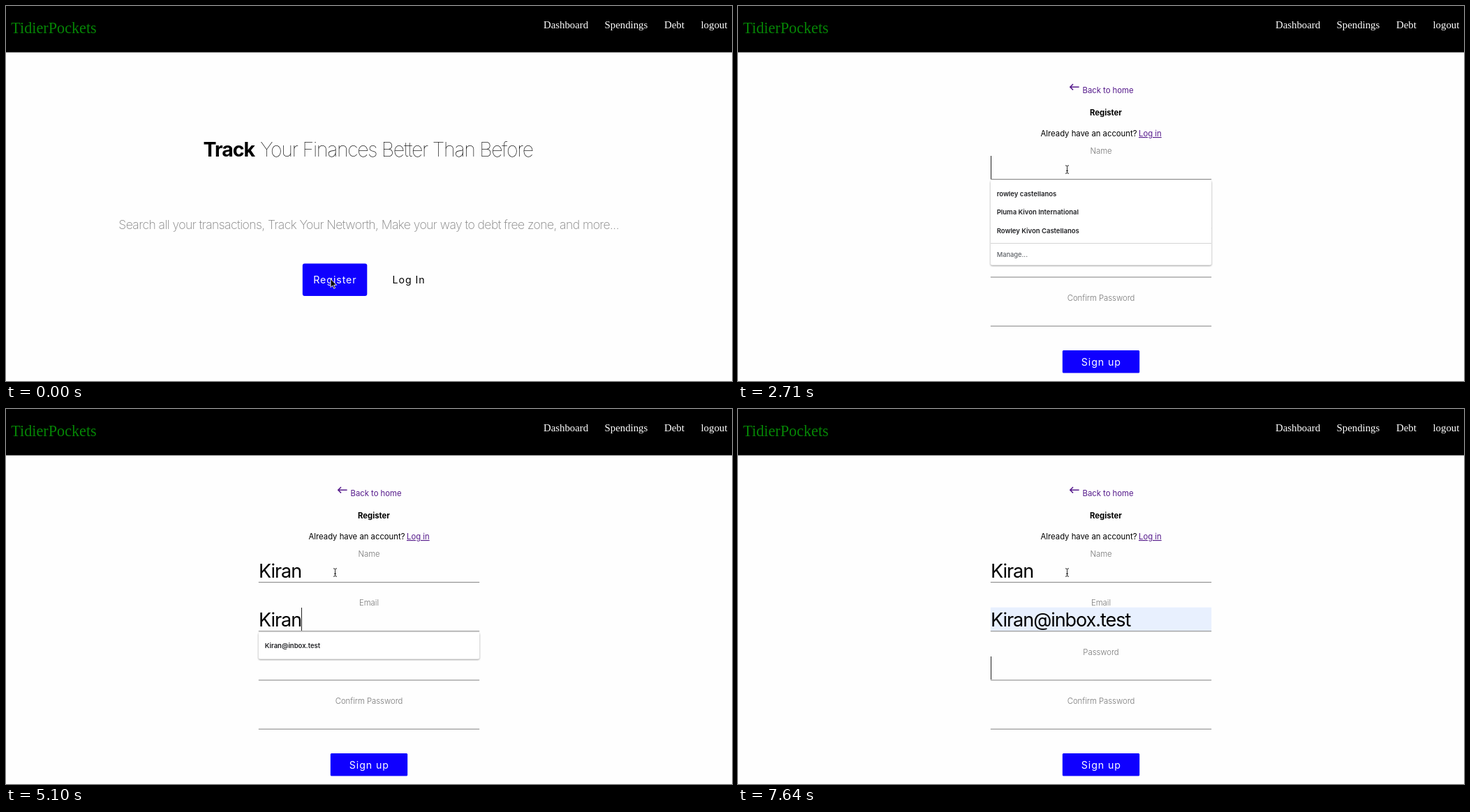
Recreate the animation shown at these times as an HTML page. Size 1040 px wide and 538 px high, loop 8000 ms.

```html
<!DOCTYPE html>
<html lang="en">
<head>
<meta charset="utf-8">
<title>Sign up</title>
<style>
html, body { margin: 0; height: 100%; overflow: hidden; background: #fefefe; }
svg { display: block; width: 100%; height: 100%; }
text { font: 11.3px Inter, sans-serif; font-optical-sizing: none; white-space: pre; }
.mid { text-anchor: middle; }
.end { text-anchor: end; }
.serif { font: 14.8px "Liberation Serif", serif; fill: #fff; }
.logo { font-size: 22.2px; fill: #058405; }
.strong { font-weight: 700; }
.title { font-size: 28.6px; font-weight: 100; letter-spacing: -1.3px; }
.title.strong { font-weight: 700; letter-spacing: -1.05px; }
.lead { font-size: 17.6px; font-weight: 200; letter-spacing: -.58px; fill: #808080; }
.button { font-size: 14.2px; letter-spacing: .92px; }
.label { font-weight: 300; fill: #777; }
.value { font-size: 27px; letter-spacing: -1.05px; }
.link { fill: #551a8b; }
.row { font-size: 9.5px; font-weight: 600; fill: #202124; }
.manage { font-size: 9.3px; font-weight: 500; fill: #5f6368; }
.white { fill: #fff; }
.blue { fill: #0f00ff; }
.panel { fill: #fff; filter: drop-shadow(0 1px 1px #0006); }
</style>
</head>
<body>
<svg viewBox="0 0 1040 538">
  <rect width="1040" height="66.5"/>
  <text class="serif logo" x="7.3" y="39.3">TidierPockets</text>
  <text class="serif" x="770" y="32">Dashboard</text>
  <text class="serif" x="857.6" y="32">Spendings</text>
  <text class="serif" x="943" y="32">Debt</text>
  <text class="serif" x="995.5" y="32">logout</text>

  <g id="home">
    <text class="title strong end" x="356" y="216">Track</text>
    <text class="title mid" x="559.6" y="216">Your Finances Better Than Before</text>
    <text class="lead mid" x="519.6" y="319.5">Search all your transactions, Track Your Networth, Make your way to debt free zone, and more...</text>
    <rect class="blue" x="424.8" y="369.6" width="92.5" height="46.5" rx="3"/>
    <text class="button white mid" x="471.4" y="398.4">Register</text>
    <text class="button mid" x="577" y="398.4">Log In</text>
  </g>

  <g id="form">
    <path d="M488.6 116.2H476M480 112l-4.2 4.2 4.2 4.2" fill="none" stroke="#551a8b" stroke-width="1.5"/>
    <text class="link" x="493.5" y="125">Back to home</text>
    <text class="strong mid" x="527" y="157">Register</text>
    <text x="433.5" y="187">Already have an account?</text>
    <text class="link" x="574" y="187" text-decoration="underline">Log in</text>
    <rect id="filled" x="361.8" y="284.6" width="316.4" height="34" fill="#e8f0fe"/>
    <g id="fields"></g>
    <rect class="blue" x="464.8" y="494" width="110.4" height="32.4" rx="1.5"/>
    <text class="button white mid" x="520.4" y="515.8">Sign up</text>
    <text id="name" class="value" x="362" y="242"></text>
    <text id="mail" class="value" x="362" y="312"></text>
    <rect id="caret" width="1" height="33" fill="#222"/>
    <g id="popup"></g>
  </g>

  <path id="arrow" d="M0 0v12l2.8-2.6 1.9 4.4 1.9-.8-1.9-4.3h3.9z" stroke="#fff" stroke-width=".9"/>
  <path id="hand" d="M5 1q1.6 0 1.6 1.6v5q.3-1.2 1.6-1 1.2.1 1.3 1.2 2.2-.8 2.6.9 2.4-.3 2.4 1.8v3q0 3.5-2 5v1.3h-7v-1.3q-2-2-4.2-6-.5-1.8 1-1.9.9 0 1.8 1.2V2.6Q4.1 1 5 1z" fill="#fff" stroke="#000"/>
  <path id="beam" d="M-2.5-5.5Q0-5.5 0-4 0-5.5 2.5-5.5M0-4V4.5M-2.5 6Q0 6 0 4.5 0 6 2.5 6M-1.5 2h3" fill="none" stroke="#111" stroke-width=".9"/>
</svg>
<script>
const LOOP = 8000, FORM_AT = 1080, PITCH = 70.2;
const el = id => document.getElementById(id);
const show = (id, on) => el(id).style.display = on ? "" : "none";

const profiles = ["rowley castellanos", "Pluma Kivon International", "Rowley Kivon Castellanos"];
const names = ["Kiran", "Kivon", "kivon", "Kelma", "kk"];
const mails = ["Kiran@inbox.test", "kivon@inbox.test", "Kivon@inbox.test"];
const me = names[0], address = mails[0];
const match = (list, s) => list.filter(v => v.toLowerCase().startsWith(s.toLowerCase()));

// time, name, mail, focused field, caret shown, suggestions
const typeName = (t, n) => [t, me.slice(0, n), "", 0, 1, n < 5 ? match(names, me.slice(0, n)) : []];
const typeMail = (t, n, caret = 1) => [t, me, me.slice(0, n), 1, caret, match(mails, me.slice(0, n))];
const typing = [
  [0, "", "", 0, 0, []],
  [1820, "", "", 0, 1, []],
  [2260, "", "", 0, 0, []],
  [2710, "", "", 0, 1, profiles],
  typeName(2860, 1), typeName(3300, 2), typeName(3450, 3), typeName(3600, 5),
  [3900, me, "", 1, 1, []],
  [4350, me, "", 1, 0, []],
  typeMail(4650, 1), typeMail(4800, 2), typeMail(4950, 3), typeMail(5100, 5),
  typeMail(5540, 5, 0), typeMail(6140, 5),
  [6590, me, address, 1, 0, [address]],
  [6890, me, address, 1, 1, []],
  [7340, me, address, 1, 0, []],
  [7640, me, address, 2, 1, []]
];

// time, shape, x, y
const pointer = [
  [0, "arrow", 465, 391.6],
  [300, "hand", 464, 386],
  [480, "hand", 464.5, 386.5],
  [1080, "arrow", 469, 392],
  [1230, "arrow", 470, 340],
  [1370, "beam", 471.5, 300],
  [1520, "arrow", 471, 256],
  [1670, "beam", 471.5, 234.3]
];

const at = (steps, t) => steps.findLast(s => s[0] <= t);

el("fields").innerHTML = ["Name", "Email", "Password", "Confirm Password"].map((label, i) =>
  `<text class="label mid" x="520" y="${212.2 + PITCH * i}">${label}</text>
   <rect x="361.8" y="${248.1 + PITCH * i}" width="316.4" height="1" fill="#808080"/>`).join("");

function popup(rows, field, picked) {
  if (!rows.length) return "";
  const top = 250 + PITCH * field, managed = rows === profiles;
  const rule = top + 12 + 26.6 * rows.length;
  let out = `<rect class="panel" x="361.7" y="${top}" width="316.6" height="${rule - top + (managed ? 30 : 0)}" rx="2.5"/>`;
  if (picked) out += `<rect x="362" y="${top + 6}" width="316" height="26" fill="#e8e8e9"/>`;
  out += rows.map((r, i) => `<text class="row" x="370.7" y="${top + 22.6 + 26.6 * i}">${r}</text>`).join("");
  if (managed) out += `<rect x="362" y="${Math.floor(rule) - 1}" width="316" height="1" fill="#d5d5d5"/>
    <text class="manage" x="370.7" y="${rule + 18.5}">Manage...</text>`;
  return out;
}

let current;
function drawForm(step) {
  if (step === current) return;
  current = step;
  const [, name, mail, field, caret, rows] = step;
  el("name").textContent = name;
  el("mail").textContent = mail;
  show("filled", mail === address);
  show("caret", caret);
  const input = [el("name"), el("mail")][field];
  el("caret").setAttribute("x", 362 + Math.floor(input?.textContent ? input.getComputedTextLength() : 0));
  el("caret").setAttribute("y", 215 + 70 * field);
  el("popup").innerHTML = popup(rows, field, mail === address);
}

function frame() {
  const t = performance.now() % LOOP;
  show("home", t < FORM_AT);
  show("form", t >= FORM_AT);
  if (t >= FORM_AT) drawForm(at(typing, t));
  const [, shape, x, y] = at(pointer, t);
  for (const id of ["arrow", "hand", "beam"]) show(id, id === shape);
  el(shape).setAttribute("transform", `translate(${x} ${y})`);
  requestAnimationFrame(frame);
}
frame();
</script>
</body>
</html>
```
